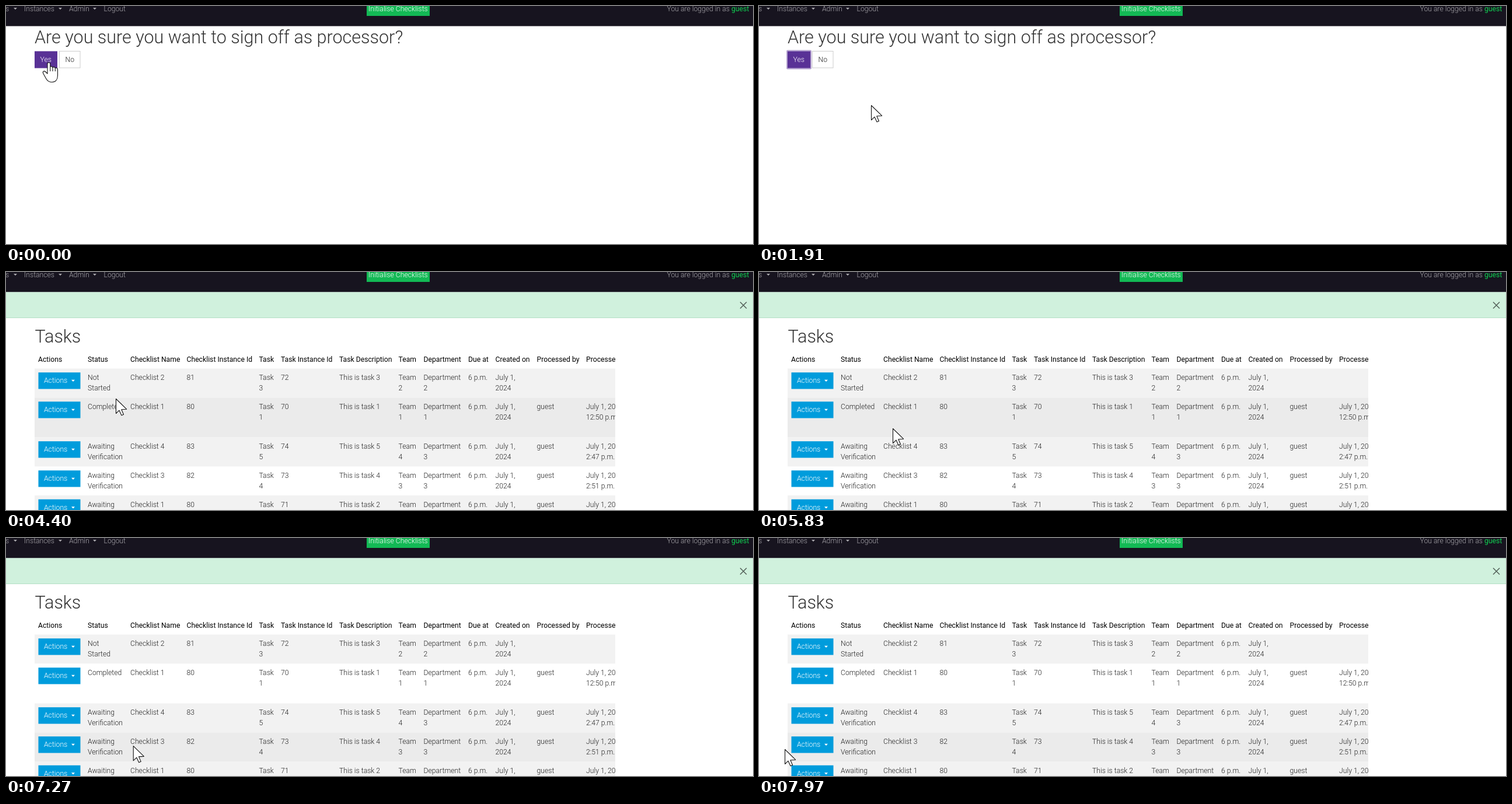
Animation, 1280 px wide and 408 px high, one loop 7990 ms. Source, as an HTML page:

```html
<!DOCTYPE html>
<html lang="en">
<head>
<meta charset="utf-8">
<style>
  html, body { margin: 0; width: 100%; height: 100%; overflow: hidden; background: #fff; }
  svg { display: block; width: 1280px; height: 408px; font: 300 12.2px Roboto, sans-serif; }
  text { white-space: pre; fill: #222; }
  .h1 { font-size: 30.5px; fill: #333; }
  .th { font-weight: 400; fill: #000; }
  .nav { fill: #aaa8ad; }
  .white { fill: #fff; }
  .user { font-weight: 400; fill: #10d052; }
  .cursor path { fill: #fff; stroke: #111; stroke-width: 1.1; stroke-linejoin: round; }
</style>
</head>
<body>
<svg viewBox="0 0 1280 408">
  <clipPath id="clip"><rect x="49" y="130" width="995" height="278"/></clipPath>
  <g id="nav"></g>
  <g id="confirm"></g>
  <g id="tasks"><g id="top"></g><g id="table" clip-path="url(#clip)"></g></g>
  <g id="cursor" class="cursor">
    <path id="arrow" d="M.5 .5V25.5L6 20.2L10 28.7L13.5 27.2L9.8 18.7L18.6 18.2Z"/>
    <path id="hand" d="M-2 2C-2 -.6 2.6 -.6 2.8 2V8C3 6 7 6 7 9C7.4 7 11 7 11.3 10C12 8.5 15.5 8.5 15.5 12V22C15.5 29 12 33.5 6 33.5C1 33.5 -2 31.5 -4 28L-9 19C-11 15.5 -8 13.5 -5.5 15.5L-2 19ZM2.8 8V15M7 9V15M11.3 10V15"/>
  </g>
</svg>
<script>
const $ = id => document.getElementById(id);
const user = 'guest';

function add(parent, tag, attrs, content = '') {
  const el = document.createElementNS('http://www.w3.org/2000/svg', tag);
  for (const k in attrs) el.setAttribute(k, attrs[k]);
  el.textContent = content;
  return parent.appendChild(el);
}
const rect = (p, x, y, width, height, fill, more) => add(p, 'rect', { x, y, width, height, fill, ...more });
const text = (p, x, y, s, cls = '') => add(p, 'text', { x, y, class: cls }, s);
const caret = (p, x, y, fill) => add(p, 'path', { d: `M${x} ${y}h6l-3 3.2z`, fill });

// Navigation bar
const nav = $('nav');
rect(nav, 0, 0, 1280, 34.5, '#17141f');
[[-1, 's', 13], [31, 'Instances', 90], [108, 'Admin', 149], [167.5, 'Logout']].forEach(([x, s, cx]) => {
  text(nav, x, 8.5, s, 'nav');
  if (cx) caret(nav, cx, 3, '#aaa8ad');
});
rect(nav, 618, 0, 108, 17, '#13b955');
text(nav, 621, 8.5, 'Initialise Checklists', 'white');
text(nav, 1132.5, 8.5, 'You are logged in as ', 'nav');
text(nav, 1243, 8.5, user, 'user');

// Confirmation page
const ask = $('confirm');
text(ask, 49, 64, 'Are you sure you want to sign off as processor?', 'h1');
const ring = rect(ask, 48, 76.5, 41, 31, 'none', { stroke: '#593196', 'stroke-width': 2, rx: 1 });
rect(ask, 49, 77.5, 39, 29, '#593196');
text(ask, 58.5, 96, 'Yes', 'white');
rect(ask, 91.5, 77.5, 35.5, 28.5, '#fff', { stroke: '#ccc' });
text(ask, 101.5, 96, 'No');

// Task page
const top_ = $('top'), table = $('table');
rect(top_, 0, 34.5, 1280, 44.5, '#d0f1dd');
rect(top_, 0, 78, 1280, 1, '#b4dfc5');
add(top_, 'path', { d: 'M1258 51.5l11 11m0-11l-11 11', stroke: '#56645c', 'stroke-width': 1.6 });
text(top_, 49.5, 120.5, 'Tasks', 'h1');

const colX = [55, 140, 213, 309.5, 433.5, 471, 571, 672.5, 715.5, 792, 838.5, 909.5, 994];
['Actions', 'Status', 'Checklist Name', 'Checklist Instance Id', 'Task', 'Task Instance Id', 'Task Description',
  'Team', 'Department', 'Due at', 'Created on', 'Processed by', 'Processed on']
  .forEach((s, i) => text(table, colX[i], 153.5, s, 'th'));

// status, checklist, instance, task, task instance, team, department, time processed
const tasks = [
  ['Not\nStarted', 2, 81, 3, 72, 2, 2, ''],
  ['Completed', 1, 80, 1, 70, 1, 1, '12:50 p.m.'],
  ['Awaiting\nVerification', 4, 83, 5, 74, 4, 3, '2:47 p.m.'],
  ['Awaiting\nVerification', 3, 82, 4, 73, 3, 3, '2:51 p.m.'],
  ['Awaiting\nVerification', 1, 80, 2, 71, 2, 2, '2:52 p.m.']
];
const rowY = [165.5, 215.5, 283.5, 333.5, 383, 433];
const stripe = i => i % 2 ? '#fff' : '#f2f2f2';
const rows = tasks.map(([status, list, inst, task, taskInst, team, dept, at], i) => {
  const y = rowY[i];
  const bg = rect(table, 49, y, 995, rowY[i + 1] - y, stripe(i));
  rect(table, 55.5, y + 6.7, 72, 28.3, '#009cdc');
  text(table, 65, y + 24.7, 'Actions', 'white');
  caret(table, 112, y + 19.3, '#fff');
  [status, `Checklist ${list}`, `${inst}`, `Task\n${task}`, `${taskInst}`, `This is task ${task}`, `Team\n${team}`,
    `Department\n${dept}`, '6 p.m.', 'July 1,\n2024', at && user, at && `July 1, 2024,\n${at}`]
    .forEach((cell, c) => cell.split('\n').forEach((s, n) => text(table, colX[c + 1], y + 19.5 + n * 18.3, s)));
  return bg;
});

// Pointer path: time, x, y
const path = [
  [0, 73, 97], [20, 73, 97], [110, 74, 93], [1470, 74, 93], [1910, 192, 170], [1990, 192, 170],
  [2160, 217, 178], [3190, 217, 178], [3290, 193.5, 217], [3460, 189.5, 218], [4360, 189.5, 218],
  [4400, 188, 217], [5210, 188, 217], [5500, 256, 252], [5830, 229, 268], [6120, 229, 268],
  [6350, 214, 330], [6560, 190, 391], [6710, 182, 373], [6850, 179, 367], [7150, 179, 367],
  [7350, 250, 345], [7490, 270.5, 325], [7700, 190, 347], [7940, 60, 367], [7970, 44, 362], [7990, 44, 362]
];
const still = (a, b) => !a || !b || a[1] === b[1] && a[2] === b[2];
function slope(i, k) {
  const a = path[i - 1], p = path[i], b = path[i + 1];
  return still(a, p) || still(p, b) ? 0 : (b[k] - a[k]) / (b[0] - a[0]);
}
function pointer(t) {
  const i = Math.max(0, path.findIndex(p => p[0] > t) - 1);
  const a = path[i], b = path[i + 1], d = b[0] - a[0], u = (t - a[0]) / d, v = 1 - u;
  return [1, 2].map(k => v * v * (1 + 2 * u) * a[k] + u * u * (3 - 2 * u) * b[k]
    + d * u * v * (v * slope(i, k) - u * slope(i + 1, k)));
}

const show = (el, on) => el.setAttribute('display', on ? 'inline' : 'none');
const LOOP = 7990, HOVER_LAG = 60;

function draw(now) {
  const t = now % LOOP, [x, y] = pointer(t), listed = t >= 2640;
  show($('confirm'), !listed);
  show($('tasks'), listed);
  ring.setAttribute('opacity', 0.45 * Math.min(1, Math.max(0, (t - 940) / 250)));
  const hoverY = pointer(Math.max(0, t - HOVER_LAG))[1];
  rows.forEach((row, i) => {
    const over = t >= 2770 && hoverY >= rowY[i] && hoverY < rowY[i + 1];
    row.setAttribute('fill', over ? '#ebebeb' : stripe(i));
  });
  const overButton = !listed && y < 107;
  show($('hand'), overButton);
  show($('arrow'), !overButton);
  $('cursor').setAttribute('transform', `translate(${x} ${y})`);
}
const start = performance.now();
(function tick() {
  draw(performance.now() - start);
  requestAnimationFrame(tick);
})();
</script>
</body>
</html>
```
